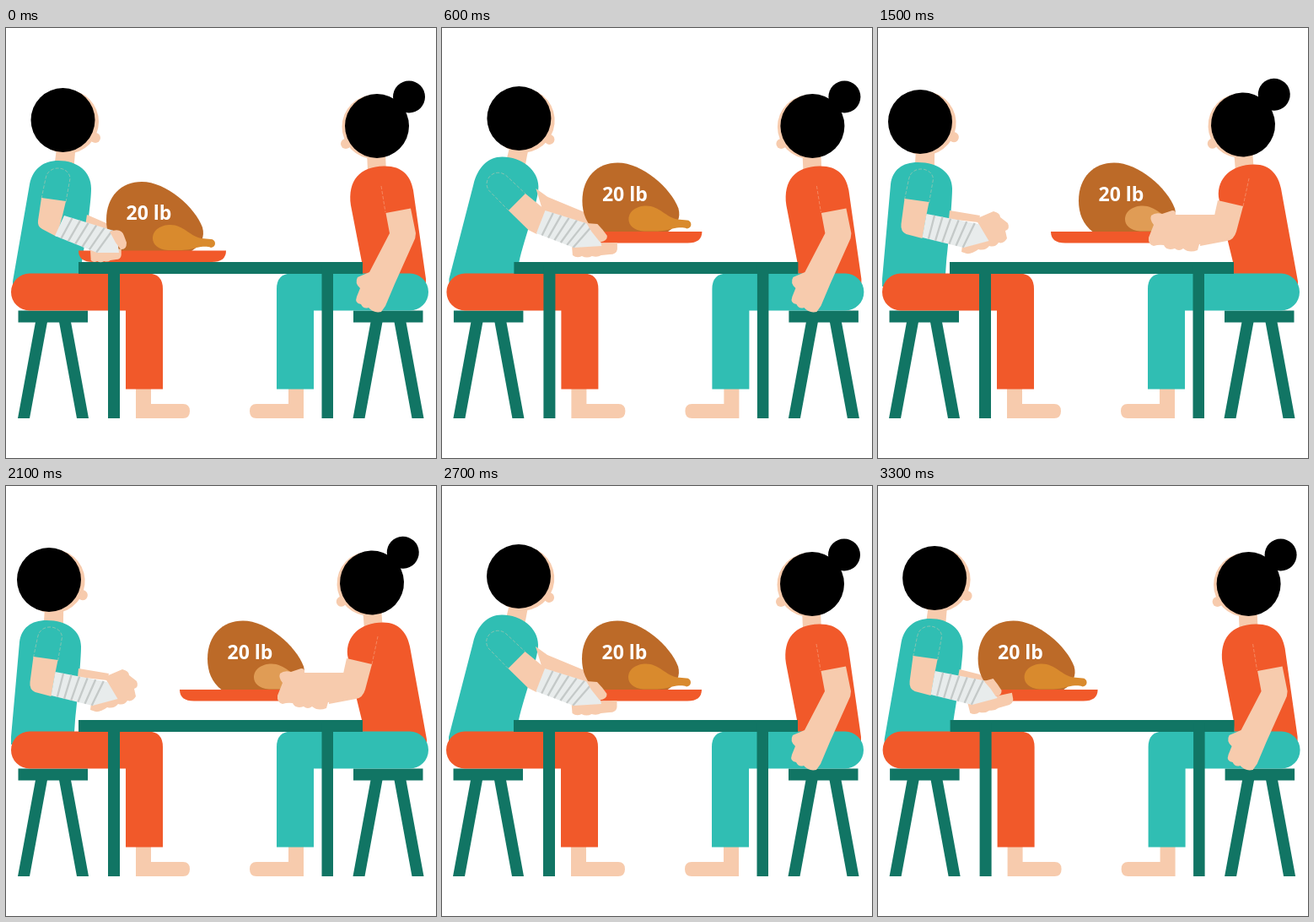
An HTML page for the animation above (3600 ms loop, 510x509 px).

```html
<!DOCTYPE html>
<html lang="en">
<head>
<meta charset="utf-8">
<title>Passing the turkey</title>
<style>
  html, body { margin: 0; width: 100%; height: 100%; overflow: hidden; background: #fff; }
  svg { display: block; width: 100vw; height: 100vh; }
  text { font: bold 23px "Open Sans", "Noto Sans", sans-serif; fill: #fff; }
</style>
</head>
<body>
<svg id="stage" viewBox="0 0 510 509"></svg>
<script>
const TEAL = '#30beb3', ORANGE = '#f1592a', GREEN = '#117564', SKIN = '#f7cbad';

const path = (d, fill) => `<path d="${d}" fill="${fill}"/>`;
const rect = (x, y, w, h, fill) => `<rect x="${x}" y="${y}" width="${w}" height="${h}" fill="${fill}"/>`;
const circle = (x, y, r, fill) => `<circle cx="${x}" cy="${y}" r="${r}" fill="${fill}"/>`;
const group = (transform, body) => `<g transform="${transform}">${body}</g>`;
const seam = d => `<path d="${d}" fill="none" stroke="${SKIN}" stroke-width=".7" stroke-dasharray="4 2" opacity=".6"/>`;

// ---- Furniture and legs ----
const stool = x => group(`translate(${x})`,
  rect(14.5, 334.5, 82.5, 14, GREEN) +
  path('M35 348H49L28 462H14ZM63 348H77L98 462H84Z', GREEN));

const legs = color =>
  path('M154 425H172V445H210Q218 445 218 453.500Q218 462 210 462H154Z', SKIN) +
  path('M28 290.500H168Q186 290.500 186 309V427.500H142V334.500H28A22 22 0 0 1 28 290.500Z', color);

const table = rect(86, 277, 337, 14, GREEN) +
  rect(121, 280, 14, 182, GREEN) + rect(374.5, 280, 13.5, 182, GREEN);

const turkey = (x, y, legColor) => group(`translate(${x} ${y})`,
  path('M136 264C124 255 119 242 119 227C119 199 137 182 161 182C190 182 224 212 233 236C236 247 232 256 220 264Z', '#bc6a28') +
  path('M192 263C180 262 174 256 174 249C174 239 184 233 195 233C210 233 219 247 232 249L243 250A5 5 0 0 1 243 260C238 258 232 259 226 260C220 262 214 263 205 263Z', legColor) +
  path('M86 263.500H261Q261 277 244 277H103Q86 277 86 263.500Z', ORANGE) +
  '<text x="142.500" y="227">20 lb</text>');

// ---- Heads ----
const manHead = (x, y, turn, torso) => {
  const at = `translate(${x} ${y}) rotate(${turn})`;
  return group(at, path('M-7 30L15 32L13 56L-10 53Z', SKIN)) + torso +
    group(at, circle(4.5, 2, 38, SKIN) + circle(38.5, 21, 6, SKIN)) + circle(x, y, 38, '#000');
};
const womanHead = (x, y, turn, torso) => {
  const at = `translate(${x} ${y}) rotate(${turn})`;
  return group(at, path('M-12 30L10 32L11 56L-11 53Z', SKIN)) + torso +
    group(at, circle(-3.5, 1, 38, SKIN) + circle(-37, 21, 6, SKIN) +
      circle(38, -34.5, 19, '#000') + circle(0, 0, 38, '#000'));
};

// ---- Bandaged arm ----
function bandage(tl, tr, tip, bottom, bl) {
  const mix = (a, b, t) => [a[0] + (b[0] - a[0]) * t, a[1] + (b[1] - a[1]) * t];
  let stripes = '';
  for (let i = 0; i < 6; i++)
    stripes += `M${mix(tl, tr, (i + 1) / 6.5)}L${mix(bl, bottom, (i + .9) / 6)}`;
  return path(`M${[tl, tr, tip, bottom, bl].join('L')}Z`, '#e8ecec') +
    `<path d="${stripes}" stroke="#c4c9c8" stroke-width="2.300"/>`;
}
const fingers = transform => group(transform,
  path('M0 -3L1 10q5 4 11 1q6 3 12 0q6 2 11 -1l10 -1q8 0 9 -6v-8Z', SKIN));

const sideSleeve = path('M42 202L47 178C50 161 75 163 76 178L71 206Z', TEAL) +
  seam('M42 202L47 178C50 161 75 163 76 178L71 206Z');

const restingArm = sideSleeve +
  path('M42 201L71 205L67 222L60 247L43 238Q37 235 38 228Z', SKIN) +
  fingers('translate(100 266) scale(.68 .9)') +
  bandage([69, 222], [131, 241], [134, 266], [108, 266], [58, 246]) +
  path('M123 241Q137 236 140 246L143 254Q143 263 136 262L130 254Z', SKIN);

const liftedForearm = sideSleeve +
  path('M42 201L71 205L68 220L63 248L44 243Q37 240 38 231Z', SKIN);
const liftedWrap = bandage([68, 219], [130, 231], [142, 251], [112, 259], [63, 247]);

const liftedArm = liftedForearm + fingers('translate(107 259) rotate(-10)') + liftedWrap +
  path('M126 231L137 228Q142 234 147 242Q147 249 140 249L134 240Z', SKIN);

const emptyArm = path('M117 226L138 217Q146 219 146 224L155 231Q158 238 152 240L154 249Q150 256 144 254Q140 260 133 258Q128 264 120 262Q112 268 106 267L100 265L101 257L130 250Z', SKIN) +
  group('translate(-9.500 1)', liftedForearm + liftedWrap);

const stretchedArm = path('M79.500 216L56 192C48 180 62 165 76 174L99.500 196Z', TEAL) +
  seam('M79.500 216L56 192C48 180 62 165 76 174L99.500 196') +
  path('M79.500 216L99.500 196L124 216L113 244L103 239Z', SKIN) +
  fingers('translate(154.500 259)') +
  bandage([123, 216], [184, 235], [190, 258], [157, 260], [112.5, 243]) +
  path('M172 231L185 232Q191 238 196.500 246Q197 252 188 253.500L178 241Z', SKIN);

// ---- Man ----
const uprightMan = manHead(67.5, 109, 0,
  path('M8 306V300L28 185C32 166 45 157 62 157C85 157 101 170 101 190C101 205 96 240 90 277L88 306Z', TEAL));
const leaningMan = manHead(92, 107, 6,
  path('M9 306V297L38 185C43 165 55 152.500 72 152.500C95 152.500 115 168 115 188C115 205 98 250 92 277L90 306Z', TEAL));
const sittingBackMan = manHead(51, 111, -4,
  path('M6 306V297L16 185C18 168 30 159 48 159C73 159 89 172 89 190C89 205 85 250 82 277L80 306Z', TEAL));

const stretchedFarArm = path('M112 190L126 200L172 219L184 233L165 234L120 216Z', SKIN);
const man = {
  down:  { body: uprightMan + path('M96 221L119 231L128 242L94 234Z', SKIN), arm: restingArm },
  lift:  { body: uprightMan + path('M97 217L121 223L130 232L95 228Z', SKIN), arm: liftedArm },
  hold:  { body: leaningMan + stretchedFarArm, arm: stretchedArm },
  share: {
    body: group('translate(-.700)', leaningMan) + path('M104 172L127 193L112 207Z', TEAL) +
      group('translate(12 -1)', stretchedFarArm),
    arm: group('translate(11.500)', stretchedArm)
  },
  empty: { body: sittingBackMan + path('M86 216L122 222L120 230L85 226Z', SKIN), arm: emptyArm }
};

// ---- Woman ----
const grip = path('M404 221L354 221Q355 216 350 216L338 220Q330 218 325 222Q323 227 328 233L322 248Q321 256 328 258Q334 256 340 257Q343 264 353 261Q358 265 363 261Q370 267 380 263L382 256L420 249Z', SKIN);

const woman = {
  rest: {
    body: womanHead(440, 116, 0,
      path('M424 306L422 277L409 210C405 180 420 164 448 163.500C470 163 480 175 483 192L498 297V306Z', ORANGE) +
      seam('M445 187L450 218')),
    arm: path('M450.500 219L480 213.500L486 243Q486 249 483 254L461 303L450 329L445 336Q436 338 430 331Q424 333 421 327Q413 326 416 318L420 308Q413 302 417 295L431 289L455 243Z', SKIN)
  },
  take: {
    body: womanHead(434, 114.5, -2,
      path('M424 306L422 277L412 236L405 200C403 178 420 161.500 447 161.500C467 161.500 476 175 479 190L499 300V306Z', ORANGE)),
    arm: path('M404 204L434 211L426 241Q423 251 415 252L383 258L385 226L400 222Z', SKIN) + grip +
      seam('M434 211L441 178')
  },
  share: {
    body: womanHead(414, 111, -8,
      path('M424 306L422 277L407 226L394 190C400 170 415 156 436 156C455 156 464 168 468 181L498 297V306Z', ORANGE)),
    arm: path('M404 170L375.500 207L400.500 229L425 200Z', ORANGE) +
      path('M375.500 207L400.500 229L384 246Q379 251 371 253L334 262L320 231L359 223Z', SKIN) +
      path('M308 231L301 229L290 228Q284 228 278 230Q274 235 281 242L276 255Q275 263 282 265Q287 262 293 264Q297 272 306 269Q311 273 316 269Q325 274 333 270L336 262L345 240Z', SKIN)
  }
};

// ---- Scenes: who holds the turkey, and where it is ----
const BROWN = '#d98a2d';
const scenes = {
  down:  [man.down, woman.rest, turkey(0, 0, BROWN)],
  lift:  [man.lift, woman.rest, turkey(0, -22.5, BROWN)],
  hold:  [man.hold, woman.rest, turkey(48, -22.5, BROWN)],
  taken: [man.empty, woman.take, turkey(120, -22.5, '#e09c55')],
  share: [man.share, woman.share, turkey(59.5, -22.5, BROWN)]
};
const order = ['down', 'lift', 'hold', 'hold', 'hold', 'taken', 'taken', 'taken', 'share', 'hold', 'hold', 'lift'];
const sway = [0, -.3, -.6, -1, -1, -1, -.5, 0, -.6, -1, -.8, -.4];

function draw(step) {
  const [him, her, bird] = scenes[order[step]];
  return group(`translate(${sway[step]})`,
    stool(0) + stool(397.5) + him.body + her.body + legs(ORANGE) +
    group('translate(507) scale(-1 1)', legs(TEAL)) +
    table + bird + him.arm + her.arm);
}

const stage = document.getElementById('stage');
const start = performance.now();
let shown = -1;
function tick() {
  const step = Math.floor((performance.now() - start) / 300) % order.length;
  if (step !== shown) stage.innerHTML = draw(shown = step);
  requestAnimationFrame(tick);
}
tick();
</script>
</body>
</html>
```
